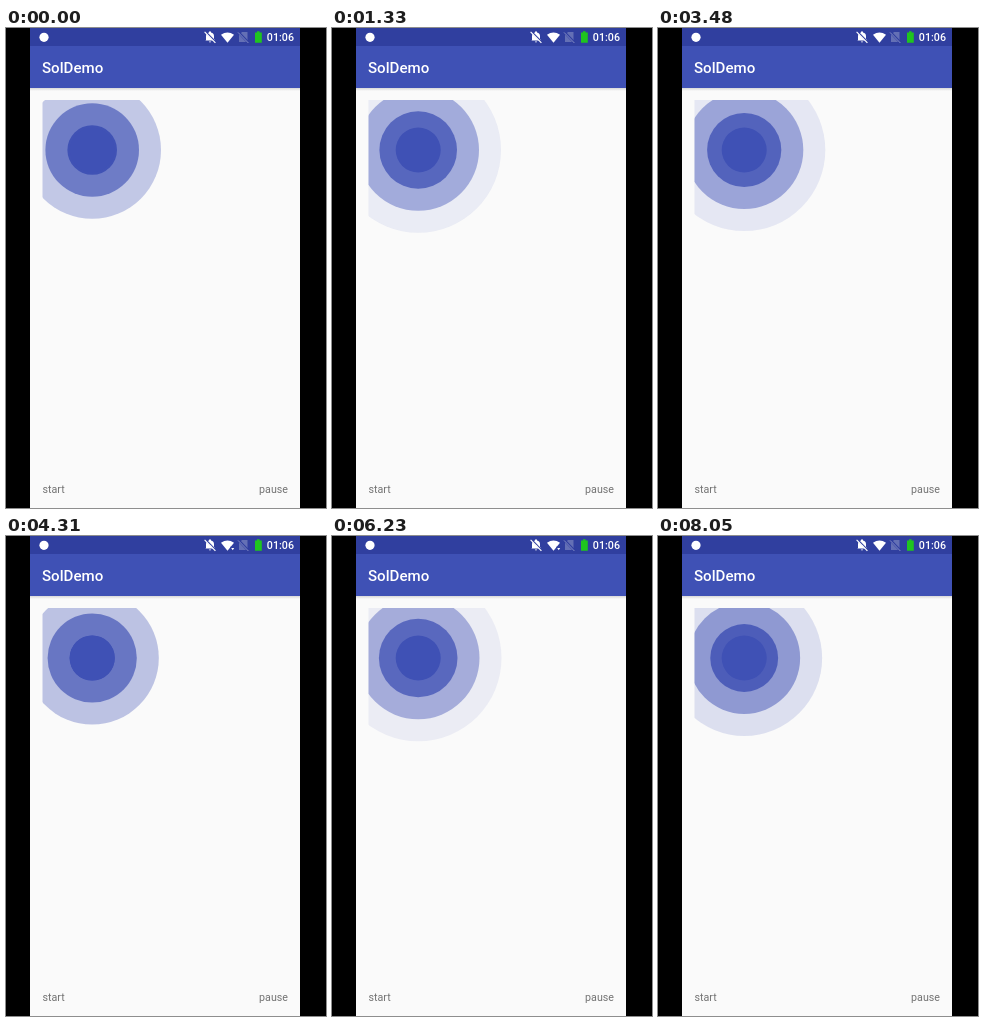
These frames come from a looping animation (320x480 px, 8.08 s). An HTML page:

```html
<!DOCTYPE html>
<html lang="en">
<head>
<meta charset="utf-8">
<title>Pulsing rings</title>
<style>
  html, body { margin: 0; width: 100%; height: 100%; overflow: hidden; background: #000; }
  svg { display: block; width: 320px; height: 480px; }
  text { font-family: Roboto, sans-serif; font-size: 10.7px; }
  .bold { font-weight: 500; fill: #fff; }
  .button { fill: #737373; }
</style>
</head>
<body>
<svg viewBox="0 0 320 480">
  <defs>
    <clipPath id="view"><rect x="36.5" y="72" width="240" height="380"/></clipPath>
    <linearGradient id="shade" x2="0" y2="1">
      <stop stop-color="#d8d8d8"/>
      <stop offset="1" stop-color="#fafafa"/>
    </linearGradient>
  </defs>

  <rect x="24" width="270" height="480" fill="#fafafa"/>
  <rect x="24" y="60" width="270" height="3" fill="url(#shade)"/>
  <rect x="24" y="18" width="270" height="42" fill="#3f51b5"/>
  <rect x="24" width="270" height="18" fill="#303f9f"/>

  <circle cx="38" cy="9.3" r="4.6" fill="#fff"/>

  <!-- muted bell -->
  <path d="M200 12V8.2Q200 5.2 203 4.6V3.6H205V4.6Q208 5.2 208 8.2V11L209.3 12.6H199.3ZM202.8 13.4H205.2Q204 15.4 202.8 13.4Z" fill="#fff"/>
  <path d="M199.4 3.6L210 14.4" stroke="#303f9f" stroke-width="1.6"/>
  <path d="M198.6 3.8L209.4 14.8" stroke="#fff" stroke-width="1.2"/>

  <!-- wifi -->
  <path d="M215 6.8Q221.5 2 228 6.8L221.5 14.8Z" fill="#fff"/>
  <g id="traffic">
    <rect x="224.4" y="10.6" width="4.4" height="4.2" fill="#303f9f"/>
    <path d="M225.2 12H228.2L226.7 14.2Z" fill="#fff"/>
  </g>

  <!-- missing SIM -->
  <path d="M236 4H241.5V14H233V7Z" fill="#6470b5"/>
  <path d="M232.4 4.2L242.6 14.8" stroke="#303f9f" stroke-width="2.4"/>
  <path d="M232 4.4L242.4 15" stroke="#838cc5"/>

  <path d="M249 4.4H251V3.2H253.6V4.4H255.8V14.8H249Z" fill="#1fc51f"/>
  <text class="bold" x="288" y="13" text-anchor="end">01:06</text>

  <text class="bold" x="36" y="45" style="font-size:15.1px">SolDemo</text>
  <text class="button" x="36.5" y="465">start</text>
  <text class="button" x="282" y="465" text-anchor="end">pause</text>

  <g id="rings" clip-path="url(#view)" fill="#3f51b5">
    <circle cx="86.2" cy="122"/>
    <circle cx="86.2" cy="122"/>
    <circle cx="86.2" cy="122"/>
    <circle cx="86.2" cy="122" r="22.5"/>
  </g>
</svg>
<script>
  const LOOP = 8080, CORE = 22.5, GAP = 22, COUNT = 3;
  const rings = document.querySelectorAll('#rings circle');
  const traffic = document.getElementById('traffic');

  // Distance travelled by the waves: [ms, px]; the pace drifts slightly.
  const pace = [[0, 2.3], [1330, 16.3], [2280, 25.2], [3480, 36.6],
                [5050, 50.8], [6230, 60.8], [LOOP, 77.7]];

  function travelled(t) {
    const i = pace.findIndex(([end]) => end > t);
    const [t0, d0] = pace[i - 1], [t1, d1] = pace[i];
    return d0 + (d1 - d0) * (t - t0) / (t1 - t0);
  }

  function draw(t) {
    const phase = travelled(t) % GAP;
    for (let i = 0; i < COUNT; i++) {
      const spread = phase + GAP * (COUNT - 1 - i);
      rings[i].setAttribute('r', CORE + spread);
      rings[i].setAttribute('opacity', 1 - spread / (GAP * COUNT));
    }
    traffic.style.display = t > 3800 && t < 7700 ? '' : 'none';
  }

  let start;
  function tick(now) {
    start ??= now;
    draw((now - start) % LOOP);
    requestAnimationFrame(tick);
  }
  draw(0);
  requestAnimationFrame(tick);
</script>
</body>
</html>
```
